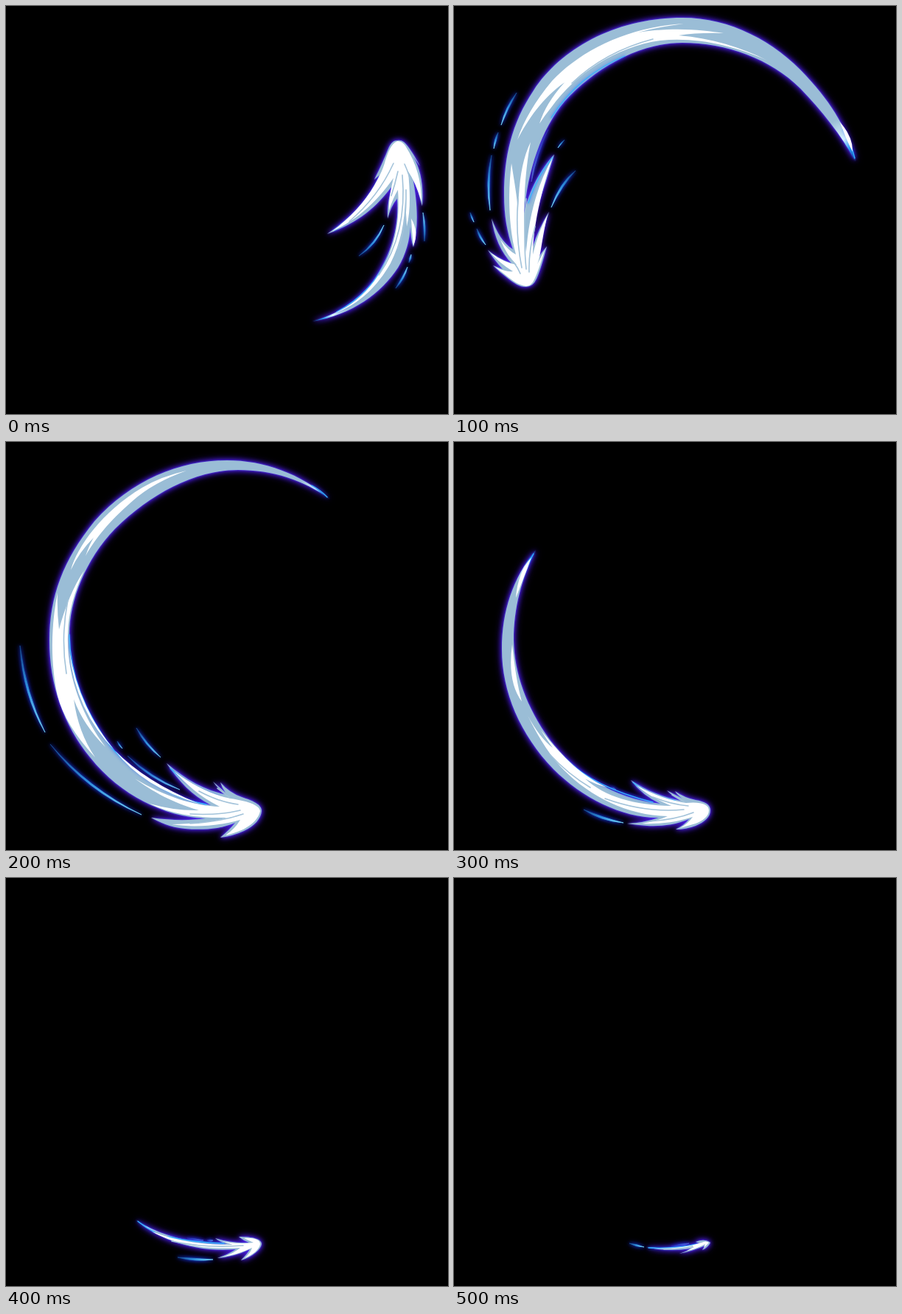
Write an HTML page that moves like this. It is 600 px wide and 555 px high and loops after 600 ms.

```html
<!DOCTYPE html>
<html lang="en">
<head>
<meta charset="utf-8">
<title>Energy slash</title>
<style>
html, body { margin: 0; width: 100%; height: 100%; overflow: hidden; background: #000; }
svg { display: block; width: 100%; height: 100%; }
.pose { opacity: 0; }
.body { filter: drop-shadow(0 0 1px #5548f0) drop-shadow(0 0 3px #4a1ce0) drop-shadow(0 0 4px #3210a0); }
.white { fill: #fff; filter: blur(.5px); }
.crease { fill: none; stroke: #a3c3da; stroke-width: 1.6; stroke-linecap: round; filter: blur(.5px); }
.rim { fill: none; stroke: #36b4ff; stroke-width: 1.3; stroke-linecap: round; filter: drop-shadow(0 0 2px #1450ff); }
.spark { filter: drop-shadow(0 0 2px #0a48e0) drop-shadow(0 0 3px #1c109a); }
</style>
</head>
<body>
<svg id="stage" viewBox="0 0 600 555"></svg>
<script>
const STEP = 100;

// tip: x, y, reach of the tail tint. streaks, sparks: start, control, end, width.
const poses = [
  {
    tip: [416, 429, 52],
    body: `M531 183C524 183 521 189 517 199C512 211 508 220 500 236L507 230C497 252 478 282 436 310
      C480 294 503 273 525 244C519 260 518 272 518 289Q522 273 531 262C534 300 523 340 497 376
      C475 404 450 419 416 429C470 420 510 390 532 356C543 338 548 318 549 300Q549 316 553 328
      C560 300 559 270 552 233Q560 252 565 272C567 245 563 222 553 205L562 218
      C555 204 546 190 540 185Q536 182 531 183Z`,
    white: `M531 184C523 187 519 198 515 210C511 225 505 235 500 244C488 265 468 288 442 307
      C480 289 505 264 526 234Q519 262 520 278Q525 262 532 250C536 305 523 342 500 374
      C485 394 468 408 446 418C480 406 505 380 522 350C536 322 541 295 542 262L544 300
      C550 275 548 250 546 225Q556 240 564 266C564 240 558 215 542 190Q537 183 531 184Z`,
    crease: 'M526 214C512 245 492 271 466 293M532 225Q528 243 523 258M538 230C543 285 531 330 506 366M541 215Q548 230 552 250M543 250Q544 300 532 330',
    rim: 'M449 416Q498 390 522 336M446 305Q485 280 507 235',
    streaks: [[550, 289, 556, 308, 553, 326, 5]],
    sparks: [[479, 340, 502, 324, 513, 298, 2], [568, 320, 569, 300, 566, 281, 2],
      [529, 384, 540, 370, 545, 355, 2], [547, 349, 549, 343, 550, 338, 2]]
  },
  {
    tip: [545, 211, 62],
    body: `M98 382C88 382 82 377 74 371Q62 362 53 353L66 358Q56 347 46 332Q58 343 78 350
      C64 335 55 315 51 289C58 308 66 322 80 331C72 308 68 285 68 257C68 205 78 160 108 115
      C145 58 220 16 310 16C375 16 435 48 478 95C515 135 535 170 545 211
      C525 175 500 143 470 112C430 72 370 50 310 50C250 50 190 86 150 130
      C118 168 100 225 95 282C102 250 118 222 136 202C128 228 121 250 113 275
      C108 295 106 315 106 330Q115 302 129 280C121 303 118 325 113 345Q118 336 126 327
      C121 345 117 360 112 371Q107 382 98 382Z`,
    white: `M86 182C95 155 110 130 133 102C170 62 235 28 312 24Q275 29 250 36C300 28 340 33 366 37
      Q330 36 305 40C350 44 390 56 425 74C380 54 330 42 280 47C220 55 165 92 132 138
      Q123 149 116 160Q124 133 150 104C120 125 100 155 86 182Z
      M98 381C88 380 80 374 70 366L56 355Q70 362 80 361Q62 350 50 336Q68 349 85 352
      Q72 340 63 318Q74 333 84 338C74 300 73 255 78 214C82 240 85 255 87 280
      C88 240 92 210 104 185C96 225 92 290 98 335C101 290 112 245 134 206
      C120 245 107 300 107 338Q115 305 127 284C118 320 118 345 111 355L123 332
      Q115 360 109 372Q105 381 98 381Z`,
    crease: 'M87 262Q83 310 92 356M98 262Q94 320 98 358M110 300Q101 335 102 362M70 338Q84 349 90 364M160 105Q205 62 270 45',
    rim: 'M132 152C155 115 190 85 232 68M101 268Q112 232 134 206M528 168Q540 189 544 207',
    streaks: [[524, 158, 537, 180, 541, 198, 5]],
    sparks: [[85, 118, 71, 139, 64, 162, 2], [60, 172, 56, 182, 54, 194, 2],
      [51, 203, 44, 240, 49, 278, 2.2], [31, 303, 35, 315, 43, 325, 2], [22, 281, 24, 288, 27, 294, 1.5],
      [165, 224, 145, 242, 132, 274, 2.4], [150, 182, 145, 187, 141, 193, 1.2],
      [128, 168, 110, 200, 105, 239, 2.6]]
  },
  {
    tip: [440, 78, 46],
    body: `M347 502C346 512 338 522 323 529Q308 536 291 538Q303 528 311 518C290 527 265 528 243 526
      C222 524 208 517 197 511C225 515 250 515 271 512C215 510 155 480 115 430
      C78 385 59 330 59 270C59 210 78 160 120 108C170 52 235 25 300 25C350 25 400 43 440 78
      C405 52 362 38 315 38C255 38 195 72 148 118C108 160 86 215 86 262
      C86 320 108 370 145 418C180 456 225 485 278 494C252 480 235 462 218 437
      C245 460 270 474 300 480Q288 472 281 462L298 477Q293 470 291 463Q303 477 320 483
      C335 488 347 493 347 502Z`,
    white: `M88 174C97 142 130 95 185 62Q210 47 245 39Q200 55 172 80C140 108 122 130 108 155
      Q113 140 119 130Q99 150 88 174Z
      M70 205C60 255 61 305 70 345Q80 385 121 429Q98 395 92 350Q105 385 135 415
      C105 375 82 320 84 262C84 235 92 205 106 175C92 195 80 225 72 255Q69 230 70 205Z
      M345 502C343 512 335 520 322 527Q308 533 298 535Q311 526 318 514C290 522 255 525 225 520
      C255 519 280 517 300 511C265 512 225 507 195 492Q230 502 262 501C225 490 200 476 175 458
      C215 482 255 495 290 496C262 482 245 465 228 448C255 468 280 480 305 485
      C325 488 344 493 345 502Z`,
    crease: 'M84 215Q74 265 82 315M250 506Q290 508 318 501M262 475Q290 490 315 493M250 519Q290 517 322 506M287 471L304 484',
    rim: 'M86 262C87 320 108 370 145 418C180 456 225 485 272 493M223 444Q248 469 290 482M415 59Q428 66 436 75',
    streaks: [[86, 285, 97, 365, 148, 420, 3], [148, 420, 188, 466, 262, 492, 4]],
    sparks: [[19, 277, 25, 343, 53, 395, 2.4], [60, 411, 110, 473, 184, 507, 2.4],
      [165, 427, 195, 457, 236, 473, 2.2], [177, 389, 190, 412, 210, 429, 2], [151, 407, 154, 413, 158, 417, 1.4]]
  },
  {
    tip: [111, 147, 50],
    body: `M348 501C348 510 340 517 328 522Q315 527 301 527Q313 521 319 513C300 521 280 523 262 522
      Q248 521 235 519Q258 518 278 511C230 512 175 485 135 445C90 398 65 340 65 282
      C65 230 80 185 111 147C92 185 81 225 81 270C82 315 98 360 130 405
      C165 450 215 485 280 492Q256 481 240 460C262 475 285 483 308 488Q296 481 289 474L310 485
      Q303 480 300 475Q313 484 328 487C340 489 348 493 348 501Z`,
    white: `M346 501C346 509 338 515 328 519L307 525Q318 519 324 510C300 518 275 520 255 519
      Q275 516 290 509C235 508 185 482 150 447Q125 423 100 372Q116 402 134 416Q126 405 118 392
      C150 432 175 455 208 470Q190 465 178 458C205 483 245 494 295 495Q262 481 248 467
      C270 480 295 488 315 491C335 489 346 493 346 501Z`,
    crease: 'M205 485Q260 505 312 500M265 516Q300 514 325 504M270 483Q295 493 318 495M130 425Q155 452 185 470M296 480L312 489',
    rim: 'M150 430Q190 470 270 490M243 463Q265 481 300 488M108 152Q98 170 92 188',
    streaks: [[79, 275, 78, 325, 92, 353, 6], [105, 157, 91, 180, 84, 212, 5]],
    sparks: [[176, 500, 200, 513, 230, 518, 2.6], [221, 476, 238, 485, 262, 489, 2.6], [212, 470, 216, 471, 220, 473, 2]]
  },
  {
    tip: [176, 465, 34],
    body: `M347 498C346 505 335 515 319 520Q328 511 331 505Q310 515 287 517Q302 512 312 505
      C255 510 205 490 176 465C210 487 250 497 300 498Q290 495 284 490Q305 497 330 496
      Q322 493 316 488C335 488 347 491 347 498Z`,
    white: `M345 498C344 505 335 513 324 517Q332 510 334 503Q315 512 296 515Q310 510 318 503
      C265 506 230 498 198 481C235 495 270 499 308 499L291 493Q310 499 336 496L323 490
      C337 489 345 492 345 498Z`,
    crease: 'M225 494Q270 504 322 500',
    rim: 'M220 488Q255 496 296 497M179 467Q190 476 202 482',
    streaks: [],
    sparks: [[233, 516, 258, 520, 281, 519, 2.6], [246, 490, 257, 493, 268, 493, 2.4], [273, 493, 277, 494, 281, 493, 2.4]]
  },
  {
    tip: [260, 502, 24],
    body: `M348 496C346 500 342 504 337 506L341 500Q325 507 306 511Q318 507 322 504Q290 509 260 502
      C290 505 315 501 333 497L328 495Q340 490 348 496Z`,
    white: 'M346 496L339 503L341 498Q328 505 316 507L326 502Q300 506 278 504Q312 504 336 496Q342 493 346 496Z',
    crease: 'M285 505Q308 505 324 501',
    rim: 'M264 503Q300 505 330 498',
    streaks: [],
    sparks: [[238, 497, 248, 500, 258, 502, 2], [295, 501, 308, 500, 319, 497, 2.6]]
  }
];

function add(parent, name, attrs) {
  const el = document.createElementNS('http://www.w3.org/2000/svg', name);
  for (const key in attrs) el.setAttribute(key, attrs[key]);
  return parent.appendChild(el);
}

function gradient(parent, type, attrs, stops) {
  const grad = add(parent, type, { gradientUnits: 'userSpaceOnUse', ...attrs });
  for (const [offset, color] of stops) add(grad, 'stop', { offset, 'stop-color': color });
  return `url(#${attrs.id})`;
}

// Tapered sliver around a quadratic curve
function blade([x0, y0, cx, cy, x1, y1, w]) {
  const len = Math.hypot(x1 - x0, y1 - y0);
  const nx = (y0 - y1) / len * w, ny = (x1 - x0) / len * w;
  return `M${x0} ${y0}Q${cx + nx} ${cy + ny} ${x1} ${y1}Q${cx - nx} ${cy - ny} ${x0} ${y0}Z`;
}

function drawPose(pose, i) {
  const g = add(stage, 'g', { class: 'pose' });
  const [cx, cy, r] = pose.tip;
  pose.sparks.forEach((s, k) => {
    const fill = gradient(g, 'linearGradient',
      { id: `spark${i}-${k}`, x1: s[0], y1: s[1], x2: s[4], y2: s[5] },
      [[0, '#164a90'], [.45, '#2f8fdc'], [1, '#7ce0ff']]);
    add(g, 'path', { class: 'spark', d: blade(s), fill, stroke: fill, 'stroke-width': .7, 'stroke-linejoin': 'round' });
  });
  const tint = gradient(g, 'radialGradient', { id: `tint${i}`, cx, cy, r },
    [[0, '#0c3f8c'], [.3, '#2ea4f2'], [.55, '#d8f4ff'], [1, '#9abdd6']]);
  add(g, 'path', { class: 'body', d: pose.body, fill: tint });
  add(g, 'path', { class: 'rim', d: pose.rim });
  add(g, 'path', { class: 'white', d: pose.white + pose.streaks.map(blade).join('') });
  add(g, 'path', { class: 'crease', d: pose.crease });
  return g;
}

const stage = document.getElementById('stage');
const total = STEP * poses.length;
const share = 1 / poses.length;

poses.map(drawPose).forEach((g, i) => g.animate([
  { opacity: 1, offset: 0 }, { opacity: 1, offset: share },
  { opacity: 0, offset: share }, { opacity: 0, offset: 1 }
], { duration: total, delay: i ? i * STEP - total : 0, iterations: Infinity }));
</script>
</body>
</html>
```
